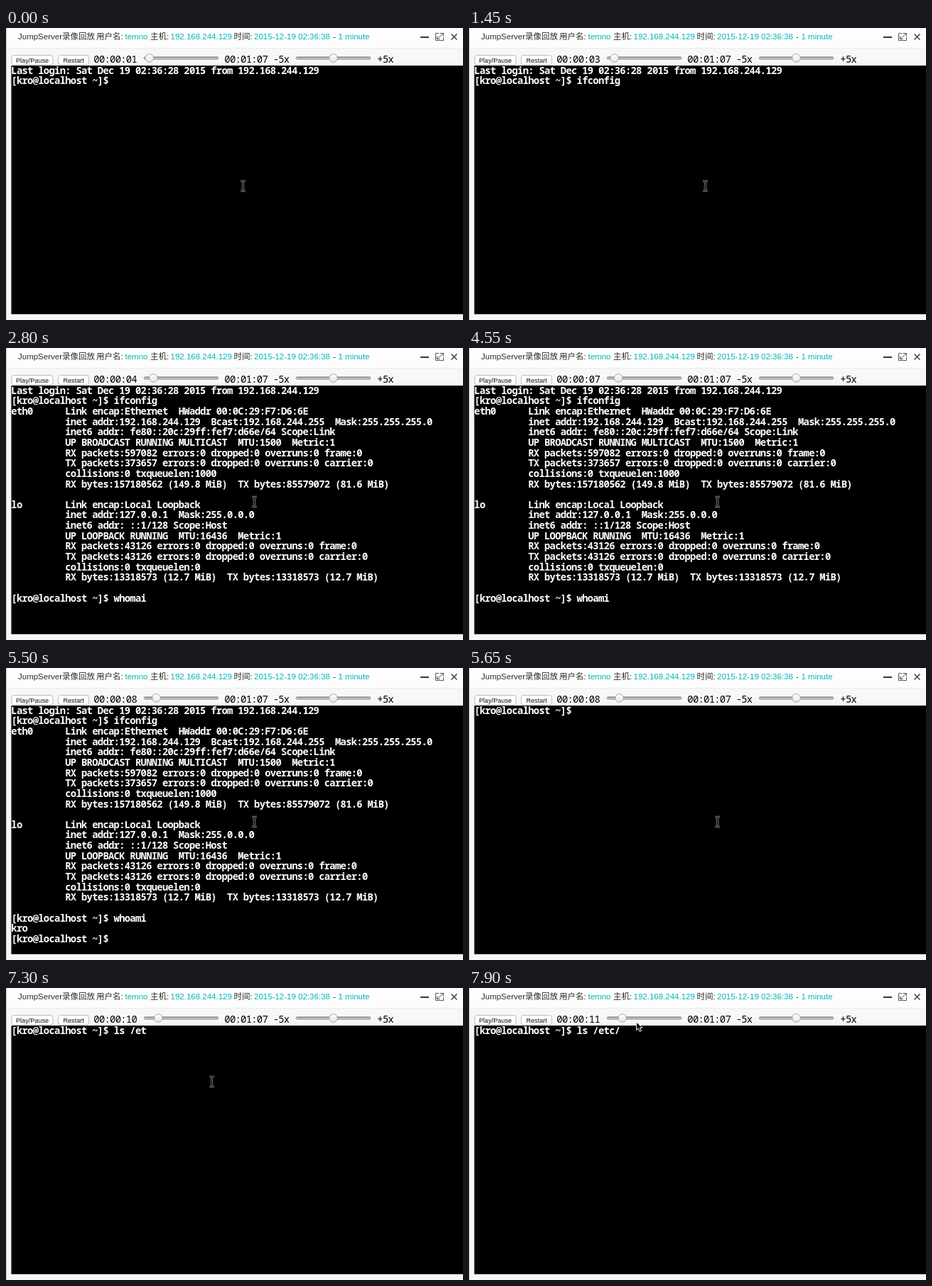
Animation of 643 by 412 pixels, one loop 8 s. Source, as an HTML page:

```html
<!DOCTYPE html>
<html lang="zh">
<head>
<meta charset="utf-8">
<title>Session replay</title>
<style>
  html, body { margin: 0; width: 100%; height: 100%; overflow: hidden; background: #f7f7f7; }
  svg { display: block; width: 643px; height: 412px; }
  text { white-space: pre; }
  .ui { font: 11.5px "Liberation Sans", "Noto Sans CJK SC", "Noto Sans CJK", sans-serif; fill: #2c2c2c; }
  .ui .hot { fill: #00b6ba; }
  .btn { font: 9.1px "Liberation Sans", sans-serif; fill: #111; }
  .mono { font: 13.8px "Noto Sans Mono", "DejaVu Sans Mono", monospace; letter-spacing: -.684px; fill: #000; }
  #screen { fill: #fff; font-weight: 600; }
</style>
</head>
<body>
<svg viewBox="0 0 643 412">
  <defs>
    <linearGradient id="groove" x2="0" y2="1">
      <stop offset="0" stop-color="#8f8f8f"/><stop offset="1" stop-color="#cfcfcf"/>
    </linearGradient>
    <linearGradient id="knob" x2="0" y2="1">
      <stop offset="0" stop-color="#fff"/><stop offset="1" stop-color="#e4e4e4"/>
    </linearGradient>
    <path id="bar" d="M-3.5 -7Q0 -7 0 -4.5Q0 -7 3.5 -7M0 -4.5V4.5M-3.5 7Q0 7 0 4.5Q0 7 3.5 7M-2 1H2"/>
  </defs>
  <rect width="643" height="412" fill="#f7f7f7"/>
  <rect width="643" height="28" fill="#fdfdfd"/>
  <path d="M0 28.5H643" stroke="#ebebeb"/>
  <path d="M.5 0V412" stroke="#c9c9c9"/>

  <g class="ui">
    <text x="17" y="16">JumpServer录像回放</text>
    <text x="127" y="16">用户名:</text>
    <text x="167.5" y="16" class="hot">temno</text>
    <text x="203" y="16">主机:</text>
    <text x="231.5" y="16" class="hot">192.168.244.129</text>
    <text x="320.5" y="16">时间:</text>
    <text x="349" y="16" class="hot">2015-12-19 02:36:38</text>
    <text x="460" y="16">-</text>
    <text x="467.5" y="16" class="hot">1 minute</text>
  </g>

  <g fill="none" stroke="#333">
    <path d="M583 13H595" stroke-width="2"/>
    <path d="M626.5 8.5l8 8M634.5 8.5l-8 8" stroke-width="1.4"/>
    <path d="M609 7.5H604.5V17.5H615.5V13M610.5 7.5H615.5V12M615.5 7.5L606.5 15.5M606.5 11.5V15.5H610.5" stroke="#555"/>
  </g>

  <g fill="#fff" stroke="#bdbdbd">
    <rect x="8" y="38.5" width="58" height="13.5" rx="3"/>
    <rect x="73.5" y="38.5" width="43" height="13.5" rx="3"/>
  </g>
  <text class="btn" x="14" y="48.5">Play/Pause</text>
  <text class="btn" x="80.5" y="48.5">Restart</text>

  <g class="mono">
    <text id="clock" x="123.3" y="48.5"></text>
    <text x="307.3" y="48.5">00:01:07 -5x</text>
    <text x="522.3" y="48.5">+5x</text>
  </g>
  <g fill="url(#groove)" stroke="#999" stroke-width=".6">
    <rect x="194" y="40.5" width="105" height="4" rx="2"/>
    <rect x="408" y="40.5" width="105" height="4" rx="2"/>
  </g>
  <g fill="url(#knob)" stroke="#999" stroke-width=".9">
    <circle id="thumb" cy="42.5" r="5.8"/>
    <circle cx="460.5" cy="42.5" r="5.8"/>
  </g>

  <rect x="7.5" y="53" width="636" height="351" fill="#000"/>
  <path d="M8 53V403.5H643" fill="none" stroke="#3c3c3c"/>
  <g id="screen" class="mono"></g>

  <g id="beam" fill="none">
    <use href="#bar" stroke="#7a7a7a" stroke-width="2.8"/>
    <use href="#bar" stroke="#000"/>
  </g>
  <path id="arrow" d="M0 0V11.5L2.7 9L4.6 13.4L6.8 12.4L4.9 8.2H8.5Z" fill="#000" stroke="#fff"/>
</svg>
<script>
const $ = id => document.getElementById(id);
const LOOP = 8000, ROW = 14.64;
const prompt = "[kro@localhost ~]$ ";
const login = "Last login: Sat Dec 19 02:36:28 2015 from 192.168.244.129";
const pad = " ".repeat(10);
const block = (name, lines) =>
  lines.map((line, i) => (i ? pad : name.padEnd(10)) + line);

const ifconfig = [
  ...block("eth0", [
    "Link encap:Ethernet  HWaddr 00:0C:29:F7:D6:6E",
    "inet addr:192.168.244.129  Bcast:192.168.244.255  Mask:255.255.255.0",
    "inet6 addr: fe80::20c:29ff:fef7:d66e/64 Scope:Link",
    "UP BROADCAST RUNNING MULTICAST  MTU:1500  Metric:1",
    "RX packets:597082 errors:0 dropped:0 overruns:0 frame:0",
    "TX packets:373657 errors:0 dropped:0 overruns:0 carrier:0",
    "collisions:0 txqueuelen:1000",
    "RX bytes:157180562 (149.8 MiB)  TX bytes:85579072 (81.6 MiB)"
  ]), "",
  ...block("lo", [
    "Link encap:Local Loopback",
    "inet addr:127.0.0.1  Mask:255.0.0.0",
    "inet6 addr: ::1/128 Scope:Host",
    "UP LOOPBACK RUNNING  MTU:16436  Metric:1",
    "RX packets:43126 errors:0 dropped:0 overruns:0 frame:0",
    "TX packets:43126 errors:0 dropped:0 overruns:0 carrier:0",
    "collisions:0 txqueuelen:0",
    "RX bytes:13318573 (12.7 MiB)  TX bytes:13318573 (12.7 MiB)"
  ]), ""
];

// Typed text as [time, value] steps
const first = [[0, ""], [500, "i"], [600, "if"], [950, "ifco"], [1100, "ifcon"],
  [1250, "ifconf"], [1450, "ifconfig"]];
const second = [[0, ""], [1900, "w"], [2050, "who"], [2250, "whom"], [2400, "whomai"],
  [3450, "whoma"], [3600, "whom"], [3700, "who"], [3850, "whoa"], [4200, "whoam"], [4350, "whoami"]];
const third = [[0, ""], [6700, "l"], [6850, "ls"], [7000, "ls "], [7100, "ls /"],
  [7200, "ls /e"], [7300, "ls /et"], [7400, "ls /etc"], [7550, "ls /etc/"]];
const OUTPUT = 1650, REPLY = 4800, CLEAR = 5650;

const clockTimes = [500, 1250, 2250, 3000, 3700, 4450, 5400, 6250, 6850, 7700];
const thumbTimes = [350, 1100, 2050, 2800, 3350, 4200, 5400, 6000, 6600, 7550];
const mouse = [[0, 333.5, 223], [350, 333.5, 223], [600, 332.5, 223], [1550, 332.5, 223],
  [1800, 349.5, 217], [7000, 349.5, 217], [7550, 240, 62], [7700, 238, 56], [7900, 235.5, 48], [8000, 235.5, 48]];

const at = (steps, t) => steps.filter(s => s[0] <= t).pop()[1];
const passed = (times, t) => 1 + times.filter(x => x <= t).length;

function screenAt(t) {
  if (t >= CLEAR) return [prompt + at(third, t)];
  const lines = [login, prompt + at(first, t)];
  if (t >= OUTPUT) lines.push(...ifconfig, prompt + at(second, t));
  if (t >= REPLY) lines.push("kro", prompt);
  return lines;
}

function mouseAt(t) {
  const i = Math.max(1, mouse.findIndex(p => p[0] > t));
  const [t0, x0, y0] = mouse[i - 1], [t1, x1, y1] = mouse[i];
  const k = (t - t0) / (t1 - t0);
  return [x0 + (x1 - x0) * k, y0 + (y1 - y0) * k];
}

const rows = Array.from({ length: 23 }, (_, i) => {
  const row = document.createElementNS("http://www.w3.org/2000/svg", "text");
  row.setAttribute("x", 7.3);
  row.setAttribute("y", 64.8 + i * ROW);
  return $("screen").appendChild(row);
});

function setText(node, value) {
  if (node.textContent !== value) node.textContent = value;
}

function draw(t) {
  const lines = screenAt(t);
  rows.forEach((row, i) => setText(row, lines[i] || ""));
  setText($("clock"), "00:00:" + String(passed(clockTimes, t)).padStart(2, "0"));
  $("thumb").setAttribute("cx", 200.4 + 1.39 * passed(thumbTimes, t));

  const [x, y] = mouseAt(t), outside = y < 57;
  $("beam").setAttribute("transform", `translate(${x} ${y})`);
  $("arrow").setAttribute("transform", `translate(${x} ${y})`);
  $("beam").style.display = outside ? "none" : "";
  $("arrow").style.display = outside ? "" : "none";
}

const start = performance.now();
function tick() {
  draw((performance.now() - start) % LOOP);
  requestAnimationFrame(tick);
}
tick();
</script>
</body>
</html>
```
